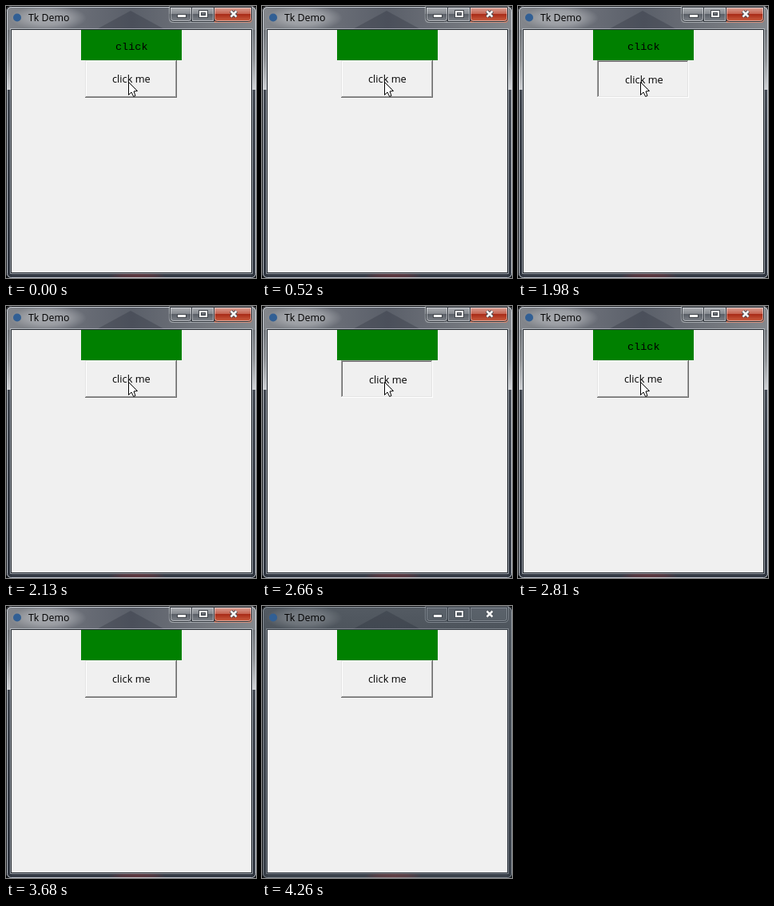
Animation of 313 by 341 pixels, one loop 4360 ms. Source, as an HTML page with a canvas:

```html
<!DOCTYPE html>
<html lang="en">
<head>
<meta charset="utf-8">
<title>Tk Demo</title>
<style>
html, body { margin: 0; width: 100%; height: 100%; overflow: hidden; background: #000; }
canvas { display: block; }
</style>
</head>
<body>
<canvas id="stage" width="313" height="341"></canvas>
<script>
const ctx = document.getElementById('stage').getContext('2d', { alpha: false });
// The window is one pixel larger than the stage on its right and bottom.
const W = 314, H = 342, LOOP = 4360;
const UI = '"Open Sans", "Noto Sans", sans-serif';
const MONO = '"Liberation Mono", "DejaVu Sans Mono", monospace';

const presses = [[400, 520], [1980, 2130], [2660, 2810], [3240, 3370]];
const labelTimes = [[0, 520], [1260, 2130], [2810, 3370]];
const within = (t, spans) => spans.some(([a, b]) => t >= a && t < b);

function rect(x, y, w, h, fill) {
  ctx.fillStyle = fill;
  ctx.fillRect(x, y, w, h);
}

function frame(x, y, w, h, color, radius = 0) {
  ctx.beginPath();
  ctx.roundRect(x + .5, y + .5, w - 1, h - 1, radius);
  ctx.strokeStyle = color;
  ctx.lineWidth = 1;
  ctx.stroke();
}

function gradient(x0, y0, x1, y1, stops) {
  const g = ctx.createLinearGradient(x0, y0, x1, y1);
  stops.forEach(([at, color]) => g.addColorStop(at, color));
  return g;
}
const down = (y0, y1, stops) => gradient(0, y0, 0, y1, stops);
const across = (x0, x1, stops) => gradient(x0, 0, x1, 0, stops);

function trace(points) {
  ctx.beginPath();
  points.forEach(([x, y]) => ctx.lineTo(x, y));
  ctx.closePath();
}

function glow(x, y, rx, ry, color) {
  ctx.save();
  ctx.translate(x, y);
  ctx.scale(rx, ry);
  const g = ctx.createRadialGradient(0, 0, 0, 0, 0, 1);
  g.addColorStop(0, `rgba(${color},.6)`);
  g.addColorStop(.55, `rgba(${color},.42)`);
  g.addColorStop(1, `rgba(${color},0)`);
  ctx.fillStyle = g;
  ctx.fillRect(-1, -1, 2, 2);
  ctx.restore();
}

function text(str, x, y, size, family) {
  ctx.font = `${size}px ${family}`;
  ctx.fillStyle = '#000';
  ctx.fillText(str, x, y);
}

function drawGlass(active) {
  rect(0, 0, W, H, '#000');
  ctx.save();
  ctx.beginPath();
  ctx.roundRect(0, 0, W, H, 6);
  ctx.clip();

  if (active) {
    rect(0, 0, W, 30, across(0, W, [
      [0, '#84878c'], [.3, '#696d76'], [.5, '#5a5f69'], [.68, '#696d75'], [1, '#85888d']
    ]));
    const side = down(30, 105, [[0, '#707479'], [.5, '#8f9296'], [1, '#cfd1d4']]);
    const low = down(105, H, [[0, '#40464f'], [.5, '#333943'], [1, '#2e343e']]);
    for (const x of [0, 307]) {
      rect(x, 30, 7, 75, side);
      rect(x, 105, 7, H - 105, low);
    }
  } else {
    rect(0, 0, W, H, down(0, H, [[0, '#545b63'], [.12, '#4b525a'], [.4, '#434a53'], [1, '#343b44']]));
  }
  trace([[112, 30], [156, 6], [200, 30]]);
  ctx.fillStyle = 'rgba(25,32,42,.24)';
  ctx.fill();

  rect(7, 334, 300, 8, active ? '#333944' : '#39404a');
  glow(164, 339, 36, 8, active ? '120,50,55' : '125,60,62');
  glow(53, 15, 48, 16, active ? '205,207,210' : '150,155,160');

  frame(0, 0, W, H, '#0c0e11', 6);
  frame(1, 1, W - 2, H - 2, active ? 'rgba(225,231,238,.8)' : 'rgba(190,197,205,.55)', 5);
  frame(5, 28, 304, 308, active ? 'rgba(205,211,217,.65)' : 'rgba(175,182,190,.5)');
  frame(6, 29, 302, 306, active ? '#22272d' : '#333a42');
  ctx.restore();
}

function drawCaption(active) {
  const corners = [0, 0, 4, 4];
  ctx.save();
  ctx.beginPath();
  ctx.roundRect(204, 1, 104, 20, corners);
  ctx.clip();
  if (active) {
    rect(204, 1, 57, 20, down(1, 20, [[0, '#b0b3b7'], [.46, '#868a90'], [.5, '#5a5f67'], [1, '#83878d']]));
    rect(261, 1, 47, 20, down(1, 20, [[0, '#dea99d'], [.46, '#c66452'], [.5, '#a92c18'], [1, '#cf6545']]));
  } else {
    rect(204, 1, 104, 20, 'rgba(115,123,132,.22)');
  }
  ctx.restore();

  // Dark outline around a thin light rim on each button.
  const rim = active ? 'rgba(235,238,241,.5)' : 'rgba(185,192,200,.4)';
  const outline = active ? '#30353c' : 'rgba(45,52,60,.7)';
  const edges = [205, 232, 260, 307];
  for (let i = 0; i < 3; i++) {
    const w = edges[i + 1] - edges[i] + 1;
    frame(edges[i], 1, w, 19, outline, i === 1 ? 0 : corners);
    frame(edges[i] + 1, 2, w - 2, 17, rim, i === 1 ? 0 : [0, 0, 3, 3]);
  }
  frame(204, 0, 105, 21, active ? 'rgba(225,229,233,.4)' : 'rgba(185,192,200,.4)', [0, 0, 5, 5]);

  const edge = active ? '#42464c' : '#454c54';
  const ink = '#f5f5f5';
  rect(214, 10, 12, 5, edge);
  rect(215, 11, 10, 3, ink);
  for (const [color, width] of [[edge, 4], [ink, 2]]) {
    ctx.strokeStyle = color;
    ctx.lineWidth = width;
    ctx.strokeRect(243, 7, 8, 6);
    ctx.lineWidth = width + .5;
    ctx.beginPath();
    ctx.moveTo(281.5, 6.5);
    ctx.lineTo(288.5, 13.5);
    ctx.moveTo(288.5, 6.5);
    ctx.lineTo(281.5, 13.5);
    ctx.stroke();
  }
}

function bevel(x, y, w, h, light, dark) {
  rect(x, y, w, h, dark);
  rect(x, y, w - 1, h - 1, light);
}

function drawButton(pressed) {
  const [x, y, w, h] = [99, 68, 115, 47];
  if (pressed) {
    bevel(x, y, w, h, '#a0a0a0', '#ffffff');
    bevel(x + 1, y + 1, w - 2, h - 2, '#696969', '#e3e3e3');
  } else {
    bevel(x, y, w, h, '#e3e3e3', '#696969');
    bevel(x + 1, y + 1, w - 2, h - 2, '#ffffff', '#a0a0a0');
  }
  rect(x + 2, y + 2, w - 4, h - 4, '#f0f0f0');
  const shift = pressed ? 1 : 0;
  text('click me', 133 + shift, 96 + shift, 12.8, UI);
}

function drawCursor(x, y) {
  ctx.save();
  ctx.translate(x, y);
  trace([[.5, .5], [.5, 16.5], [4, 13], [6.7, 18.5], [9, 17.5], [7, 12], [11.5, 11.5]]);
  ctx.fillStyle = '#fff';
  ctx.fill();
  ctx.strokeStyle = '#000';
  ctx.lineWidth = 1;
  ctx.stroke();
  ctx.restore();
}

function draw(t) {
  const active = t < 4260;
  drawGlass(active);
  drawCaption(active);

  ctx.beginPath();
  ctx.arc(14, 14.5, 5, 0, Math.PI * 2);
  ctx.fillStyle = '#315f94';
  ctx.fill();
  text('Tk Demo', 28, 19, 12.4, UI);

  rect(7, 30, 300, 304, '#f0f0f0');
  rect(94, 30, 126, 38, '#008000');
  if (within(t, labelTimes)) text('click', 137, 55, 13.5, MONO);
  drawButton(within(t, presses));

  if (t < 3520) drawCursor(153, 95);
  else if (t < 3680) drawCursor(181, 175);
}

const start = performance.now();
function tick() {
  draw((performance.now() - start) % LOOP);
  requestAnimationFrame(tick);
}
tick();
</script>
</body>
</html>
```
